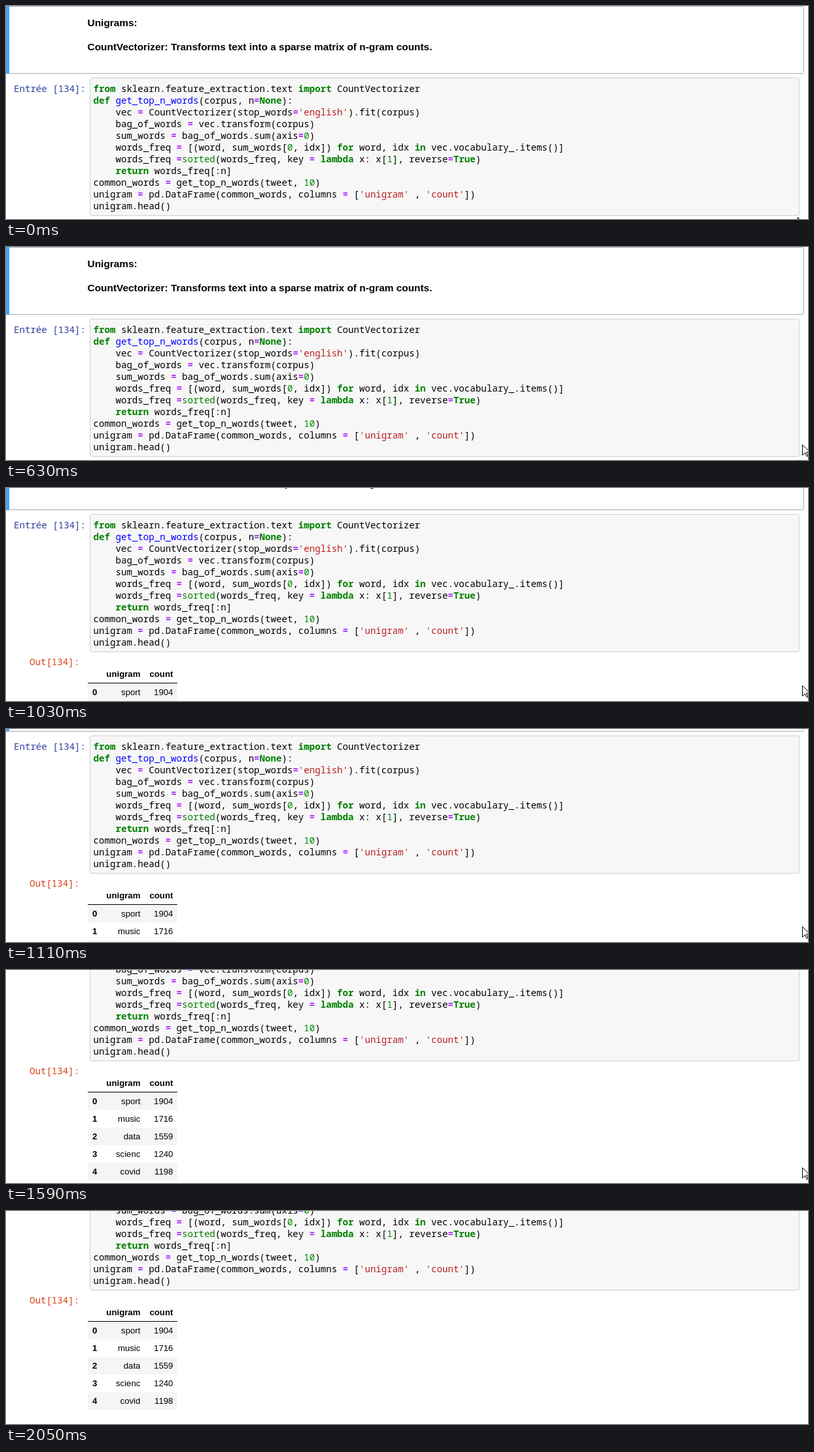
Write an HTML page that moves like this. It is 1226x327 px and loops after 3.35 s.

```html
<!DOCTYPE html>
<html lang="en">
<head>
<meta charset="utf-8">
<title>Unigram counts</title>
<style>
  html, body { margin: 0; width: 100%; height: 100%; overflow: hidden; background: #fff; }
  svg { display: block; width: 1226px; height: 327px; }
  text { white-space: pre; }
  .mono { font: 14.12px "Noto Sans Mono", "DejaVu Sans Mono", monospace; }
  .head { font: bold 15.4px "Liberation Sans", Arial, sans-serif; }
  .cell { font: 13.2px "Liberation Sans", Arial, sans-serif; text-anchor: end; }
  .bold { font-weight: bold; }
  .in { fill: #303f9f; }
  .out { fill: #d84315; }
  .keyword { fill: #008000; font-weight: bold; }
  .builtin { fill: #008000; }
  .name { fill: #00f; }
  .string { fill: #ba2121; }
  .number { fill: #080; }
  .operator { fill: #a2f; font-weight: bold; }
</style>
</head>
<body>
<svg viewBox="0 0 1226 327">
  <g id="page">
    <rect x=".5" y=".5" width="1219" height="103" rx="2" fill="#fff" stroke="#ababab"/>
    <rect width="5" height="104" fill="#42a5f5"/>
    <text class="head" x="124.6" y="31">Unigrams:</text>
    <text class="head" x="124.6" y="68">CountVectorizer: Transforms text into a sparse matrix of n-gram counts.</text>
    <rect x="128.5" y="110.5" width="1084" height="211" rx="2" fill="#f7f7f7" stroke="#cfcfcf"/>
    <text class="mono in" x="12" y="132">Entrée [134]:</text>
    <g id="code"></g>
    <text class="mono out" x="36" y="342">Out[134]:</text>
    <g id="table"></g>
  </g>
  <path id="cursor" d="M.5 .5V16.5L4.5 12.8 7 18.5 9 17.6 6.6 11.9 11.5 11.5Z" fill="#fff" stroke="#000"/>
</svg>
<script>
const LOOP = 3350;
const $ = id => document.getElementById(id);

const source = `from sklearn.feature_extraction.text import CountVectorizer
def get_top_n_words(corpus, n=None):
    vec = CountVectorizer(stop_words='english').fit(corpus)
    bag_of_words = vec.transform(corpus)
    sum_words = bag_of_words.sum(axis=0)
    words_freq = [(word, sum_words[0, idx]) for word, idx in vec.vocabulary_.items()]
    words_freq =sorted(words_freq, key = lambda x: x[1], reverse=True)
    return words_freq[:n]
common_words = get_top_n_words(tweet, 10)
unigram = pd.DataFrame(common_words, columns = ['unigram' , 'count'])
unigram.head()`;

const token = new RegExp([
  "(?<string>'[^']*')",
  "(?<name>(?<=def )\\w+)",
  "(?<keyword>\\b(?:from|import|def|for|in|lambda|return|None|True)\\b)",
  "(?<builtin>\\bsorted\\b)",
  "(?<number>\\b\\d+\\b)",
  "(?<operator>=)"
].join("|"), "g");

const highlight = line => line.replace(token, (match, ...rest) => {
  const groups = rest[rest.length - 1];
  const kind = Object.keys(groups).find(key => groups[key]);
  return `<tspan class="${kind}">${match}</tspan>`;
});

$("code").innerHTML = source.split("\n").map((line, i) =>
  `<text class="mono" x="133.6" y="${132 + 18 * i}">${highlight(line)}</text>`).join("");

const cell = (x, y, value, bold = "") =>
  `<text class="cell ${bold}" x="${x}" y="${y}">${value}</text>`;

const rows = [["sport", 1904], ["music", 1716], ["data", 1559], ["scienc", 1240], ["covid", 1198]];
$("table").innerHTML =
  cell(205.4, 360, "unigram", "bold") + cell(255.4, 360, "count", "bold") +
  '<rect x="125" y="369" width="137" height="1"/>' +
  rows.map(([word, count], i) => {
    const top = 370 + 27 * i;
    const band = i % 2 ? "" : `<rect x="125" y="${top}" width="137" height="27" fill="#f5f5f5"/>`;
    return band + cell(139.3, top + 18, i, "bold") +
      cell(205.4, top + 18, word) + cell(255.4, top + 18, count);
  }).join("");

// Each step [ms, x, y] holds until the next one.
function play(id, steps) {
  const frames = steps.map(([ms, x, y]) => ({
    offset: ms / LOOP, transform: `translate(${x}px, ${y}px)`, easing: "steps(1, end)"
  }));
  frames.push({ ...frames[frames.length - 1], offset: 1 });
  $(id).animate(frames, { duration: LOOP, iterations: Infinity });
}

play("page", [
  [0, 0, 0], [950, 0, -18], [1030, 0, -70], [1110, 0, -100],
  [1500, 0, -129], [1590, 0, -182], [1650, 0, -200]
]);

play("cursor", [
  [0, 1210, 324], [70, 1210, 321], [140, 1211, 317], [200, 1212, 313],
  [270, 1213, 310], [340, 1214, 307], [410, 1215, 305], [480, 1216, 304],
  [630, 1217, 303], [1970, 1222, 309], [2050, 1240, 340]
]);
</script>
</body>
</html>
```
